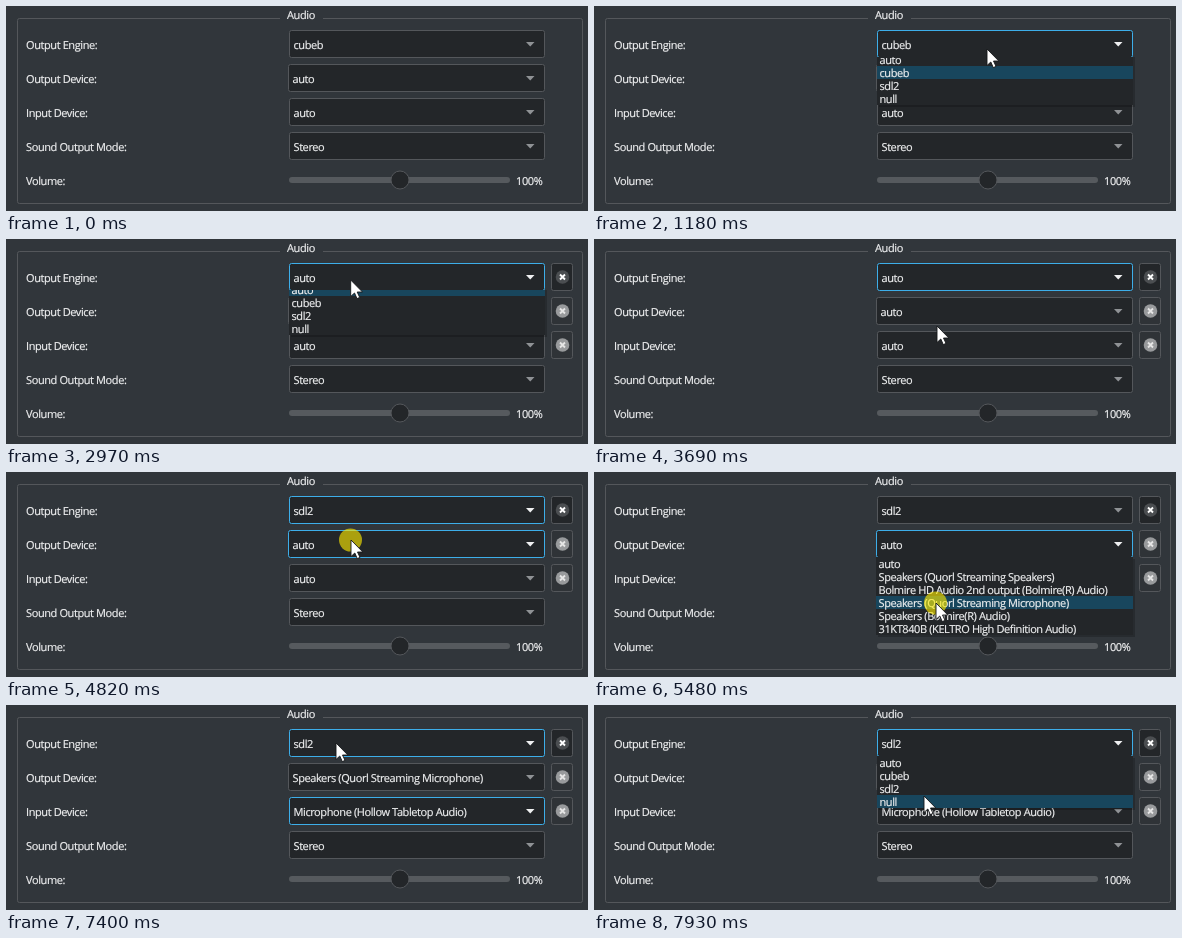
An HTML page for the animation above (8000 ms loop, 582 by 205 pixels).

```html
<!DOCTYPE html>
<html lang="en">
<head>
<meta charset="utf-8">
<title>Audio settings</title>
<style>
  html, body { margin: 0; width: 100%; height: 100%; overflow: hidden; background: #31363b; }
  svg { display: block; width: 100vw; height: 100vh; }
  text {
    font: 11px "Open Sans", "Noto Sans", sans-serif;
    letter-spacing: -.4px;
    fill: #eff0f1;
    stroke: #eff0f1;
    stroke-width: .2px;
    text-rendering: geometricPrecision;
    white-space: pre;
  }
  .frame { fill: none; stroke: #54575b; }
  .box { fill: #232629; stroke: #54575b; }
  .arrow { fill: #8f9295; }
  .active .box { stroke: #3daee9; }
  .active .arrow { fill: #eff0f1; }
  .disc { fill: #4b4e51; }
  .cross { stroke: #fff; stroke-width: 1.9; }
  .dim .box { fill: #2f3337; }
  .dim .disc { fill: #989a9c; }
  .dim .cross { stroke: #e6e6e6; }
</style>
</head>
<body>
<svg id="stage" viewBox="0 0 582 205"></svg>
<script>
const LOOP = 8000, STEP = 73, MOVE = 260, SLIDE = 158, HOLD = 145;
const ROW = 13, HEIGHT = 28, PITCH = 34, RIGHT = 539;

const MIC = "Quorl Streaming Microphone";
const FIELDS = [
  { label: "Output Engine:", x: 283, value: 1, items: ["auto", "cubeb", "sdl2", "null"] },
  { label: "Output Device:", x: 282, value: 0, items: [
    "auto",
    "Speakers (Quorl Streaming Speakers)",
    "Bolmire HD Audio 2nd output (Bolmire(R) Audio)",
    `Speakers (${MIC})`,
    "Speakers (Bolmire(R) Audio)",
    "31KT840B (KELTRO High Definition Audio)"
  ] },
  { label: "Input Device:", x: 283, value: 0, items: [
    "auto",
    "Microphone (Bolmire(R) Audio)",
    "Microphone (Hollow Tabletop Audio)",
    "Microphone (QL Neo Webcam K415)",
    `Microphone (${MIC})`
  ] },
  { label: "Sound Output Mode:", x: 283, value: 0, items: ["Stereo"] }
];
FIELDS.forEach((f, i) => {
  f.y = 24 + i * PITCH;
  f.top = f.y + HEIGHT - 1;
});

// The pointer goes to a field, presses it, aims at a row and picks it
const USES = [
  { go: 520, at: [393, 43], press: 960, aim: 1440, to: [366, 57], pick: 1740 },
  { go: 2430, at: [345, 33], press: 2720, aim: 2900, to: [343, 87], pick: 3510 },
  { go: 4150, at: [345, 68], press: 4760, aim: 4930, to: [342, 131], pick: 5480 },
  { go: 6010, at: [340, 108], press: 6250, aim: 6320, to: [338, 148], pick: 6650 },
  { go: 7010, at: [330, 38], press: 7540, aim: 7600, to: [330, 91], pick: LOOP }
];
for (const u of USES) {
  u.field = FIELDS.find(f => inField(f, u.at));
  u.row = rowAt(u.field, u.to[1]);
  u.open = u.press + 62;
  u.close = u.pick + 150;
  u.done = u.close + STEP;
}

function inField(f, [x, y]) {
  return x >= f.x && x < RIGHT && y >= f.y && y < f.y + HEIGHT;
}
function rowAt(f, y) {
  return Math.floor((y - f.top) / ROW);
}

const stage = document.getElementById("stage");

function set(el, attrs) {
  for (const key in attrs) el.setAttribute(key, attrs[key]);
}
function add(parent, tag, attrs = {}, content = "") {
  const el = document.createElementNS("http://www.w3.org/2000/svg", tag);
  set(el, attrs);
  el.textContent = content;
  return parent.appendChild(el);
}
function show(el, on) {
  el.setAttribute("visibility", on ? "visible" : "hidden");
}

// Group frame
add(stage, "rect", { class: "frame", x: 11.5, y: 12.5, width: 565, height: 185, rx: 2 });
add(stage, "rect", { x: 274, y: 11, width: 43, height: 3, fill: "#31363b" });
add(stage, "text", { x: 281, y: 13 }, "Audio");

FIELDS.forEach((f, i) => {
  add(stage, "text", { x: 20, y: f.y + 19 }, f.label);
  f.combo = add(stage, "g");
  add(f.combo, "rect", { class: "box", x: f.x + .5, y: f.y + .5,
    width: RIGHT - f.x - 1, height: HEIGHT - 1, rx: 2 });
  add(f.combo, "path", { class: "arrow", d: `M520 ${f.y + 12}h8.5l-4.25 4.5z` });
  f.text = add(f.combo, "text", { x: f.x + 4.5, y: f.y + 19 });

  if (i === 3) return;
  f.clear = add(stage, "g", { class: i ? "dim" : "" });
  add(f.clear, "rect", { class: "box", x: 545.5, y: f.y + .5, width: 21, height: 27, rx: 2 });
  add(f.clear, "circle", { class: "disc", cx: 556.5, cy: f.y + 14, r: 6.8 });
  add(f.clear, "path", { class: "cross", d: `M554 ${f.y + 11.5}l5 5m0-5l-5 5` });
});

// Volume
add(stage, "text", { x: 20, y: 179 }, "Volume:");
add(stage, "rect", { x: 283, y: 171, width: 221, height: 6, rx: 3, fill: "#565a5e" });
add(stage, "circle", { class: "box", cx: 394, cy: 174, r: 9 });
add(stage, "text", { x: 510, y: 179 }, "100%");

// Lists, each sliding out from under its field
FIELDS.forEach((f, i) => {
  const size = { x: f.x, y: f.top, width: RIGHT - f.x, height: f.items.length * ROW };
  const clip = add(stage, "clipPath", { id: "clip" + i });
  add(clip, "rect", { ...size, width: size.width + 2, height: size.height + 2 });
  f.list = add(stage, "g", { "clip-path": `url(#clip${i})` });
  f.sheet = add(f.list, "g");
  add(f.sheet, "rect", { ...size, x: f.x + 2, y: f.top + 2, "fill-opacity": .2 });
  add(f.sheet, "rect", { ...size, fill: "#232629" });
  f.mark = add(f.sheet, "rect", { ...size, height: ROW, fill: "#18465d" });
  f.items.forEach((item, n) =>
    add(f.sheet, "text", { x: f.x + 2.5, y: f.top + n * ROW + 11 }, item));
});

const halo = add(stage, "circle", { r: 11.5, fill: "#ffeb00", "fill-opacity": .62 });
const pointer = add(stage, "path", { d: "M0 0V16.5L3.8 13L6.3 18.6L9 17.4L6.5 12H11.8Z",
  fill: "#fff", stroke: "#16181a", "stroke-width": .9 });

function tipAt(t) {
  let tip = [420, 105];
  const glide = (start, end) => {
    const u = Math.min(1, Math.max(0, (t - start) / MOVE));
    const e = u * (2 - u);
    tip = tip.map((v, i) => v + (end[i] - v) * e);
  };
  for (const u of USES) {
    glide(u.go, u.at);
    glide(u.aim, u.to);
  }
  return tip;
}

function draw(t) {
  const tick = Math.floor(t / STEP) * STEP;
  const tip = tipAt(tick), [x, y] = tip;
  const seen = t >= USES[0].go;
  const last = USES.filter(u => u.open <= t).pop();
  const open = last && t < last.close ? last : null;

  for (const f of FIELDS) {
    const done = USES.filter(u => u.field === f && u.done <= t).pop();
    const current = done ? done.row : f.value;
    f.text.textContent = f.items[current];

    const hover = seen && !open && inField(f, tip);
    f.combo.classList.toggle("active", hover || !!last && last.field === f);
    if (f.clear) show(f.clear, t >= USES[0].done);

    const dropped = !!open && open.field === f;
    f.list.setAttribute("display", dropped ? "inline" : "none");
    if (!dropped) continue;
    const p = Math.min(1, Math.max(0, (tick - open.open) / SLIDE));
    const shift = Math.round(-f.items.length * ROW * (1 - p));
    f.sheet.setAttribute("transform", `translate(0 ${shift})`);
    const row = rowAt(f, y);
    const lit = p === 1 && f.items[row] ? row : current;
    f.mark.setAttribute("y", f.top + lit * ROW);
  }

  show(pointer, seen);
  pointer.setAttribute("transform", `translate(${x.toFixed(1)} ${y.toFixed(1)})`);
  show(halo, USES.some(u => [u.press, u.pick].some(s => t >= s && t < s + HOLD)));
  set(halo, { cx: x - .5, cy: y });
}

const began = performance.now();
function loop() {
  draw((performance.now() - began) % LOOP);
  requestAnimationFrame(loop);
}
loop();
</script>
</body>
</html>
```
